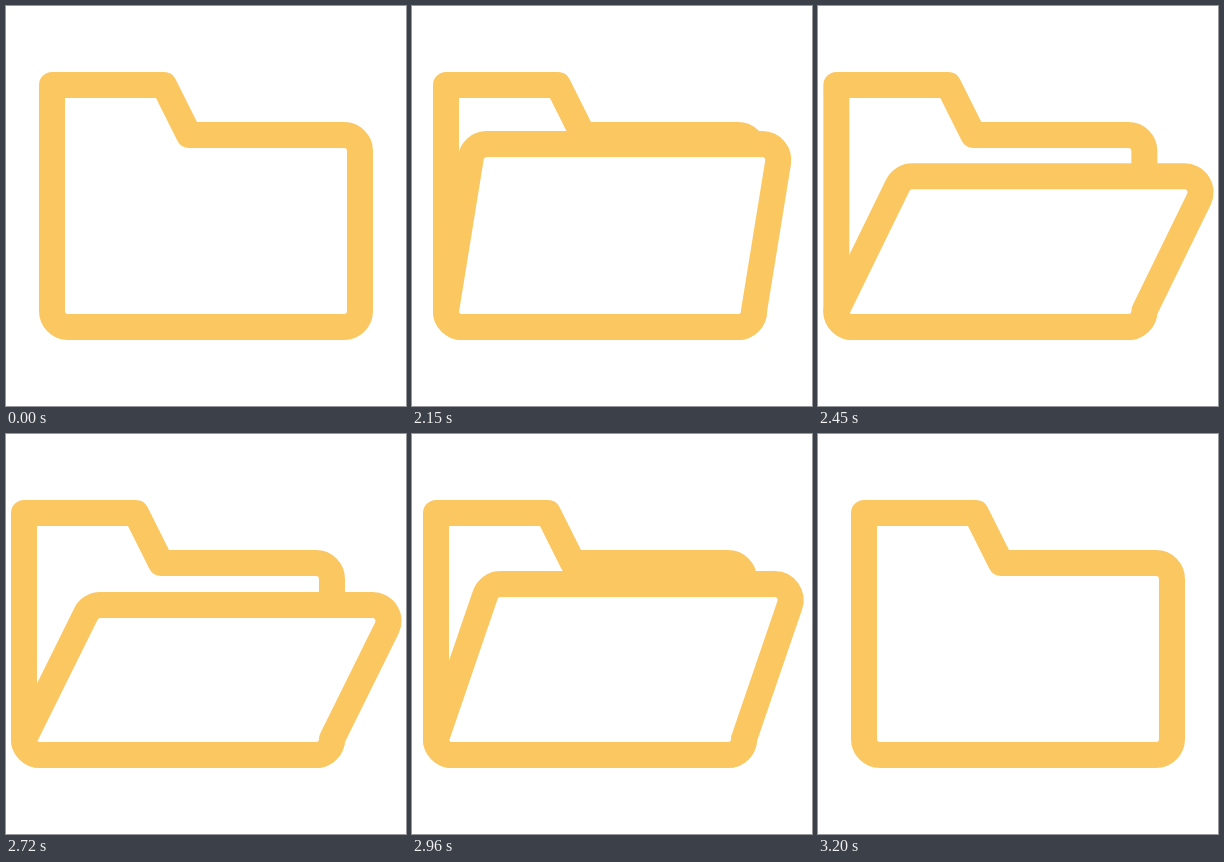
These frames come from a looping animation (400 by 400 pixels, 3.23 s). An HTML page with a canvas:

```html
<!DOCTYPE html>
<html lang="en">
<head>
<meta charset="utf-8">
<title>Folder</title>
<style>
  html, body { margin: 0; height: 100%; overflow: hidden; background: #fff; }
  canvas { display: block; width: 400px; height: 400px; }
</style>
</head>
<body>
<canvas id="stage" width="400" height="400"></canvas>
<script>
const ctx = document.getElementById('stage').getContext('2d');

const LOOP = 3230, START = 2000, END = 3200, STEP = 30;
const LEFT = 46, RIGHT = 354, TOP = 79, SHELF = 129, BOTTOM = 321, RADIUS = 16;
const HINGE = BOTTOM - RADIUS;

// Opening curves over the time since the lid was shut; closing mirrors them.
const times = [0, 30, 120, 150, 240, 300, 480, 600];
const shiftAt = curve(times, [0, 0.3, 6.4, 12, 22, 25, 28, 29]);
const slantAt = curve(times, [0, 0.006, 0.086, 0.162, 0.342, 0.4275, 0.495, 0.51]);
const lidTopAt = curve(times, [129, 129.2, 134.5, 138, 150, 164, 171, 173]);

// Monotone cubic interpolation through a few keys.
function curve(xs, ys) {
  const slopes = xs.slice(1).map((x, i) => (ys[i + 1] - ys[i]) / (x - xs[i]));
  const tangents = xs.map((_, i) => {
    const a = slopes[i - 1] || 0, b = slopes[i] || 0;
    return a * b > 0 ? 2 * a * b / (a + b) : 0;
  });
  return x => {
    let i = 0;
    while (i < xs.length - 2 && x > xs[i + 1]) i++;
    const h = xs[i + 1] - xs[i];
    const u = Math.min(1, Math.max(0, (x - xs[i]) / h));
    const v = 1 - u;
    return v * v * ((1 + 2 * u) * ys[i] + u * h * tangents[i])
         + u * u * ((1 + 2 * v) * ys[i + 1] - v * h * tangents[i + 1]);
  };
}

function bottomEdge(left, right) {
  ctx.lineTo(right, HINGE);
  ctx.arcTo(right, BOTTOM, right - RADIUS, BOTTOM, RADIUS);
  ctx.arcTo(left, BOTTOM, left, HINGE, RADIUS);
  ctx.closePath();
}

function paint() {
  ctx.fill();
  ctx.stroke();
}

function drawBack(shift, lean) {
  const left = LEFT - shift, right = RIGHT - shift;
  ctx.beginPath();
  ctx.moveTo(left, TOP);
  ctx.lineTo(158 - shift, TOP);
  ctx.lineTo(183 - shift, SHELF);
  ctx.arcTo(right + lean, SHELF, right, HINGE, RADIUS);
  bottomEdge(left, right);
  paint();
}

function drawLid(shift, slant, top) {
  const left = LEFT - shift, right = RIGHT - shift;
  const reach = slant * (HINGE - top);
  ctx.beginPath();
  ctx.moveTo(left, HINGE);
  ctx.arcTo(left + reach, top, right + reach, top, RADIUS);
  ctx.arcTo(right + reach, top, right, HINGE, RADIUS);
  bottomEdge(left, right);
  paint();
}

function draw(time) {
  const first = START + STEP;
  const t = first + Math.floor((time - first) / STEP) * STEP;
  const open = Math.max(0, Math.min(t - START, END - t));
  const shift = shiftAt(open), slant = slantAt(open);
  const lidShown = open > STEP;

  ctx.fillStyle = '#fff';
  ctx.fillRect(0, 0, 400, 400);
  ctx.strokeStyle = '#fbc761';
  ctx.lineWidth = 26;
  ctx.lineJoin = 'round';
  drawBack(shift, lidShown ? 0 : slant * (HINGE - SHELF));
  if (lidShown) drawLid(shift, slant, lidTopAt(open));
}

const begin = performance.now();
function tick() {
  draw((performance.now() - begin) % LOOP);
  requestAnimationFrame(tick);
}
tick();
</script>
</body>
</html>
```
